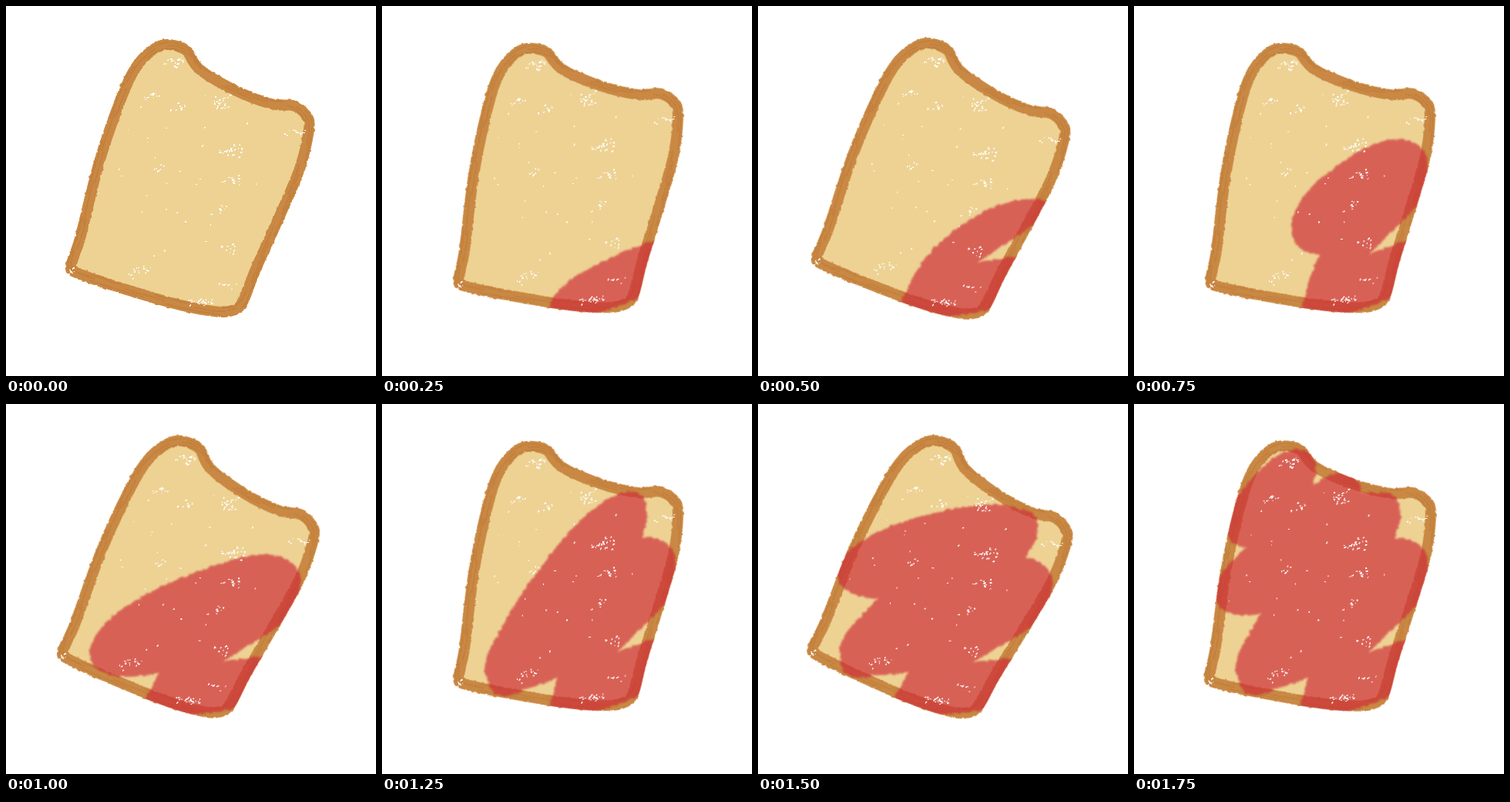
These frames come from a looping animation (480x480 px, 2000 ms). An HTML page:

```html
<!DOCTYPE html>
<html lang="en">
<head>
<meta charset="utf-8">
<title>Jam on bread</title>
<style>
  @property --step { syntax: '<number>'; inherits: true; initial-value: 0; }
  html, body { margin: 0; width: 100%; height: 100%; overflow: hidden; background: #fff; }
  svg { display: block; width: 100vw; height: 100vh; }
  #slice {
    transform-origin: 240px 224px;
    animation: tilt 2s step-end infinite, count 2s steps(8) infinite;
  }
  #jam path { opacity: calc(var(--step) - var(--from) + 1); }
  @keyframes count { from { --step: 0; } to { --step: 8; } }
  @keyframes tilt {
    0%, 100% { transform: rotate(0deg); }
    12.5%, 37.5%, 62.5% { transform: rotate(-7.1deg); }
    25% { transform: rotate(4.2deg); }
    50% { transform: rotate(5.8deg); }
    75% { transform: rotate(7.3deg); }
    87.5% { transform: rotate(-6.4deg); }
  }
</style>
</head>
<body>
<svg viewBox="0 0 480 480">
  <defs>
    <filter id="rough" color-interpolation-filters="sRGB">
      <feTurbulence type="fractalNoise" baseFrequency=".2" numOctaves="2" seed="4"/>
      <feDisplacementMap in="SourceGraphic" scale="3" xChannelSelector="R" yChannelSelector="G"/>
    </filter>
    <filter id="fuzzy" color-interpolation-filters="sRGB">
      <feTurbulence type="fractalNoise" baseFrequency=".16" numOctaves="3" seed="9"/>
      <feDisplacementMap in="SourceGraphic" scale="5" xChannelSelector="R" yChannelSelector="G"/>
      <feGaussianBlur stdDeviation=".8"/>
    </filter>
    <path id="outline"/>
    <clipPath id="edge"><use href="#outline"/></clipPath>
  </defs>
  <g id="slice">
    <g filter="url(#rough)">
      <g clip-path="url(#edge)">
        <use href="#outline" fill="#edd293" stroke="#c98843" stroke-width="28"/>
        <g id="streaks" fill="none" stroke="#b47030" stroke-width="1.5" opacity=".4"/>
      </g>
    </g>
    <g clip-path="url(#edge)">
      <g id="jam" fill="#ce2b39" opacity=".67" filter="url(#fuzzy)"/>
    </g>
    <path id="flecks" fill="#fff" shape-rendering="crispEdges"/>
  </g>
</svg>
<script>
const $ = id => document.getElementById(id);

function addPath(parent, attrs) {
  const path = document.createElementNS('http://www.w3.org/2000/svg', 'path');
  for (const key in attrs) path.setAttribute(key, attrs[key]);
  parent.append(path);
}

// Closed smooth curve through a flat list of x, y values
function smooth(flat) {
  const n = flat.length / 2;
  const at = i => [flat[(i + n) % n * 2], flat[(i + n) % n * 2 + 1]];
  let d = `M${at(0)}`;
  for (let i = 0; i < n; i++) {
    const [a, b, c, e] = [at(i - 1), at(i), at(i + 1), at(i + 2)];
    const p = b.map((v, k) => v + (c[k] - a[k]) / 6);
    const q = c.map((v, k) => v - (e[k] - b[k]) / 6);
    d += `C${p} ${q} ${c}`;
  }
  return d + 'Z';
}

const outline = smooth([
  209, 43, 238, 52, 256, 77, 300, 103, 345, 120, 376, 123, 396, 139, 400, 160,
  388, 212, 362, 274, 330, 345, 311, 391, 290, 403, 262, 402, 210, 391, 130, 367,
  90, 353, 78, 345, 79, 330, 90, 297, 113, 205, 138, 130, 160, 80, 184, 53
]);
$('outline').setAttribute('d', outline);

// Brush streaks run along the crust
for (let i = 1; i <= 3; i++) {
  const s = 1 - i * .022;
  addPath($('streaks'), {
    d: outline, 'stroke-dasharray': `${90 - i * 15} ${20 + i * 10}`,
    transform: `translate(240 224) scale(${s}) translate(-240 -224)`
  });
}

// Blunt spindle of jam from one tip to the other; bend bows its axis sideways
function smear(from, x1, y1, x2, y2, width, bend = 0) {
  const len = Math.hypot(x2 - x1, y2 - y1);
  const nx = (y2 - y1) / len, ny = (x1 - x2) / len;
  const points = [];
  const steps = 80;
  for (let i = 0; i < steps; i++) {
    const angle = i / steps * 2 * Math.PI;
    const u = -Math.cos(angle), t = (u + 1) / 2;
    const half = width * Math.sqrt(1 - Math.abs(u) ** 2.5) * Math.sign(Math.sin(angle));
    const off = half + bend * (1 - u * u);
    points.push([x1 + (x2 - x1) * t + nx * off, y1 + (y2 - y1) * t + ny * off]);
  }
  addPath($('jam'), { d: `M${points.join('L')}Z`, style: `--from:${from}` });
}

// The knife zigzags up the slice, one stroke per step
smear(1, 198, 391, 407, 328, 31);
smear(2, 205, 395, 378, 246, 26, 18);
smear(3, 200, 304, 379, 204, 50);
smear(4, 122, 346, 379, 204, 53);
smear(5, 128, 362, 347, 130, 48);
smear(6, 105, 243, 353, 143, 50);
smear(7, 134, 168, 246, 64, 36);
smear(7, 194, 185, 302, 102, 33);

// Seeded white flecks, looser where there are more of them
let seed = 11;
const rand = () => (seed = seed * 16807 % 2147483647) / 2147483647;
const spread = size => (rand() + rand() - 1) * size;
let flecks = '';
function scatter(x, y, count, rx = 12 + count / 3, ry = 7 + count / 8) {
  for (let i = 0; i < count; i++) {
    const w = 1 + rand() * 2, h = 1 + rand();
    flecks += `M${x + spread(rx)} ${y + spread(ry)}l${w} ${-h / 2}v${h}l${-w} ${h / 2}z`;
  }
}
[
  [219, 72, 20], [187, 117, 12], [222, 131, 9], [276, 125, 24], [292, 187, 28],
  [292, 225, 15], [281, 263, 7], [376, 165, 14], [196, 211, 6], [288, 313, 10],
  [174, 345, 18], [288, 362, 7]
].forEach(c => scatter(...c));
scatter(253, 384, 28, 20, 5);
scatter(83, 345, 8, 6, 7);
scatter(215, 230, 30, 110, 130);
$('flecks').setAttribute('d', flecks);
</script>
</body>
</html>
```
